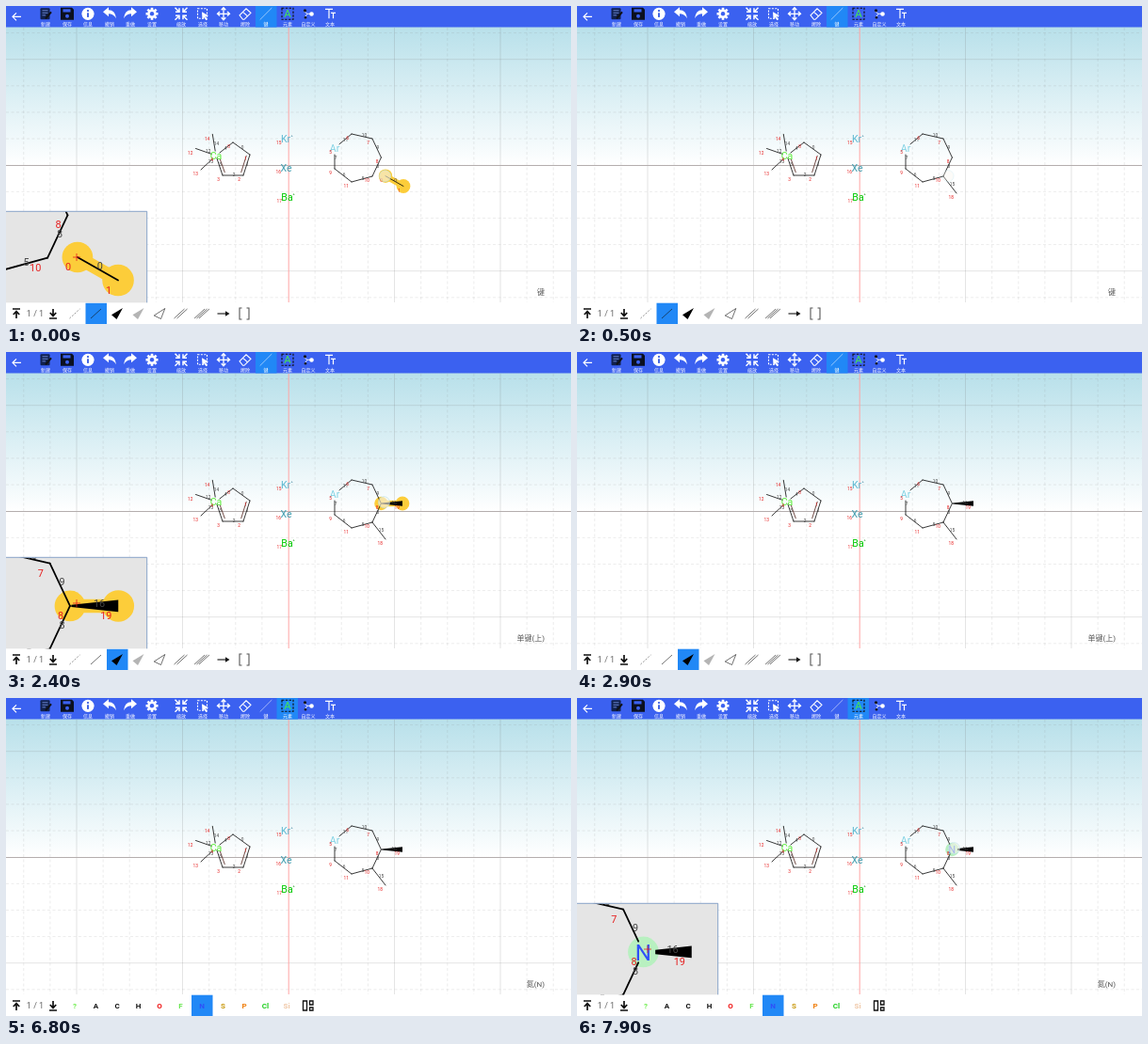
Animation of 600x338 px, one loop 8000 ms. Source, as an HTML page:

```html
<!DOCTYPE html>
<html lang="zh">
<head>
<meta charset="utf-8">
<style>
html, body { margin: 0; width: 100%; height: 100%; overflow: hidden; background: #fff; }
svg { display: block; width: 100vw; height: 100vh; }
text { font-family: Roboto, "Noto Sans CJK SC", "Noto Sans CJK", sans-serif; }
.caption { font-size: 5px; font-weight: 500; fill: #fff; text-anchor: middle; }
.hint { font-size: 8px; fill: #555; text-anchor: end; }
.num { font-size: 4.8px; fill: #444; }
.num.atom { fill: #e62020; text-anchor: end; }
.symbol { font-size: 10.6px; text-anchor: middle; }
.charge { font-size: 4px; }
.pick { font-size: 8px; font-weight: 700; text-anchor: middle; }
.bond { stroke: #000; stroke-width: .78; stroke-linecap: round; fill: none; }
.inner { stroke: #4a1a14; }
.white { stroke: #fff; stroke-width: 1.5; fill: none; }
.black { stroke: #111; stroke-width: 1.1; fill: none; }
</style>
</head>
<body>
<svg id="stage" viewBox="0 0 600 338" preserveAspectRatio="none" xmlns="http://www.w3.org/2000/svg"></svg>
<script>
const LOOP = 8000, ZOOM = 2.27, PITCH = 28.125;

// Markup helpers; "when" is a list such as "0-400 2300-2700" in ms.
const show = (when, body) => `<g data-on="${when}">${body}</g>`;
const path = (d, cls = 'black', extra = '') => `<path class="${cls}" d="${d}" ${extra}/>`;
const shape = (d, fill) => `<path d="${d}" fill="${fill}"/>`;
const text = (x, y, str, cls, extra = '') => `<text class="${cls}" x="${x}" y="${y}" ${extra}>${str}</text>`;
const rect = (x, y, w, h, fill, extra = '') =>
  `<rect x="${x}" y="${y}" width="${w}" height="${h}" fill="${fill}" ${extra}/>`;
const disc = (x, y, r, fill) => `<circle cx="${x}" cy="${y}" r="${r}" fill="${fill}"/>`;
const at = (x, y, body) => `<g transform="translate(${x} ${y})">${body}</g>`;

const atoms = {
  0: [241, 145], 1: [259, 158], 2: [252, 180], 3: [230, 180], 4: [223, 159],
  5: [349, 151], 6: [367, 136], 7: [389, 141], 8: [398.4, 161], 9: [349, 173],
  10: [389, 181], 11: [367, 187], 12: [201.5, 151.5], 13: [207, 174], 14: [219.3, 136.3],
  15: [295.5, 140.3], 16: [295, 171.5], 17: [296, 202.5], 18: [403, 199], 19: [421, 161]
};

// Point at a given distance from a towards b.
function toward(a, b, dist) {
  const len = Math.hypot(b[0] - a[0], b[1] - a[1]);
  return [a[0] + (b[0] - a[0]) * dist / len, a[1] + (b[1] - a[1]) * dist / len];
}
const line = (a, b, cls = 'bond') => path(`M${a}L${b}`, cls);
const atomNumber = (p, n) => text(p[0] - 3, p[1] + 6.2, n, 'num atom');
const bondNumber = (a, b, n) =>
  text((a[0] + b[0]) / 2 - .3, (a[1] + b[1]) / 2 + .5, n, 'num');

function bond(i, j, number, { trimI = 0, trimJ = 0, center } = {}) {
  const a = atoms[i], b = atoms[j];
  let out = line(toward(a, b, trimI), toward(b, a, trimJ));
  if (center) {
    const inner = p => toward(p, center, 4);
    out += line(toward(inner(a), b, trimI), toward(inner(b), a, trimJ), 'bond inner');
  }
  return out + bondNumber(a, b, number);
}
function wedge(start) {
  const half = .5 + (start - 399) * .1;
  return shape(`M${start} ${161 - half}L421 158.2V163.8L${start} ${161 + half}Z`, '#000') +
    bondNumber(atoms[8], atoms[19], 16);
}
const symbol = (x, y, str, fill) => text(x, y + 3.8, str, 'symbol', `fill="${fill}"`);
const glow = (a, b) =>
  path(`M${a}L${b}`, '', 'stroke="#fccd3a" stroke-width="6.4"') +
  disc(a[0], a[1], 7.2, '#fccd3a') + disc(b[0], b[1], 7.4, '#fccd3a');

function molecules() {
  const left = [241, 164];
  const loose = [[403, 180.7], [422, 191.5]];
  const numbers = Object.keys(atoms).filter(n => n < 18)
    .map(n => atomNumber(atoms[n], n)).join('');
  return show('0-100', glow(...loose) + line(...loose) + atomNumber(loose[0], 0) +
      atomNumber(loose[1], 1) + bondNumber(...loose, 0)) +
    show('100-400', glow(atoms[10], atoms[18])) +
    show('2300-2700', glow(atoms[8], atoms[19])) +
    show('7800-8000', disc(...atoms[8], 7.2, '#b8f0c0')) +
    bond(0, 1, 0) + bond(1, 2, 1, { center: left }) + bond(2, 3, 2) +
    bond(3, 4, 3, { trimJ: 3, center: left }) + bond(4, 0, 4, { trimI: 5 }) +
    bond(4, 12, 12, { trimI: 5 }) + bond(4, 13, 13, { trimI: 5 }) + bond(4, 14, 14, { trimI: 5 }) +
    bond(10, 11, 5) + bond(11, 9, 6) + bond(9, 5, 7, { trimJ: 7 }) +
    bond(7, 6, 10) + bond(6, 5, 11, { trimJ: 6.5 }) +
    show('0-7800', bond(8, 10, 8) + bond(8, 7, 9)) +
    show('7800-8000', bond(8, 10, 8, { trimI: 5.5 }) + bond(8, 7, 9, { trimI: 5.5 }) +
      symbol(...atoms[8], 'N', '#3050f8')) +
    show('100-8000', bond(10, 18, 15) + atomNumber(atoms[18], 18)) +
    show('2300-7800', wedge(399)) + show('7800-8000', wedge(404)) +
    show('2300-8000', atomNumber(atoms[19], 19)) +
    symbol(...atoms[4], 'Ca', '#5cee3c') + symbol(...atoms[5], 'Ar', '#80d1e3') +
    symbol(297, 141.2, 'Kr', '#5cb8d1') + symbol(297.5, 172, 'Xe', '#429eb0') +
    symbol(298.5, 203, 'Ba', '#00c900') +
    text(302.6, 138.6, '+', 'charge', 'fill="#357f98"') +
    text(304.6, 200.6, '+', 'charge', 'fill="#008a00"') + numbers;
}

function grid() {
  let out = rect(0, 22, 600, 148, 'url(#sky)');
  const ruled = (k, d) => path(d, '', k % 4
    ? 'stroke="#888" stroke-opacity=".23" stroke-width=".7" stroke-dasharray="3 2.5"'
    : 'stroke="#777" stroke-opacity=".22" stroke-width=".9"');
  for (let k = -10; k <= 10; k++) if (k) out += ruled(k, `M${300 + k * PITCH} 23V315`);
  for (let k = -5; k <= 5; k++) if (k) out += ruled(k, `M0 ${169.2 + k * PITCH}H600`);
  return out + path('M0 169.5H600', '', 'stroke="#b4aeae"') + path('M300.2 23V315', '', 'stroke="#ffa4a4"');
}

function header() {
  const spread = [0, 90, 180, 270];
  const around = (angles, d, extra) =>
    angles.map(a => path(d, 'white', `transform="rotate(${a})" ${extra || ''}`)).join('');
  const undo = shape('M-7 -2L-1 -7V-4Q6 -4 7 5Q4 0 -1 0V3Z', '#fff');
  const items = [
    [42, '新建', rect(-5.5, -6, 10, 12, '#10204c', 'rx="1"') +
      path('M-3.5 -3.5H2.5M-3.5 -1H2.5M-3.5 1.5H0', 'white', 'style="stroke-width:.8;stroke:#7f9cf0"') +
      path('M0 5L6 -2', 'black', 'style="stroke-width:2"')],
    [65, '保存', shape('M-7 -6.5H5L7 -4.5V6.5H-7Z', '#0b1020') + rect(-4.5, -5, 8, 3.2, '#3b61f0') +
      disc(0, 2.5, 2, '#3b61f0')],
    [87, '信息', disc(0, 0, 6.6, '#fff') + rect(-.9, -1, 1.8, 4.6, '#2e55de') + disc(0, -3.2, 1.1, '#2e55de')],
    [110, '撤销', undo],
    [132, '重做', `<g transform="scale(-1 1)">${undo}</g>`],
    [155, '设置', around([0, 45, 90, 135], 'M0 -6.5V6.5', 'style="stroke-width:2.6"') +
      disc(0, 0, 4.8, '#fff') + disc(0, 0, 2.2, '#3b61f0')],
    [186, '缩放', around(spread, 'M6.5 -6.5L2 -2M2 -6V-2H6')],
    [209, '选择', path('M-5.5 -5.5H4.5V5H-5.5Z', 'white', 'stroke-dasharray="2 1.4" style="stroke-width:1.1"') +
      shape('M-1 -2L6 2L3 3L5 6L3.5 7L1.5 4L-.5 6Z', '#fff')],
    [231, '移动', around(spread, 'M0 0V-6M-2.3 -4L0 -6.5L2.3 -4', 'style="stroke-width:1.3"')],
    [254, '擦除', path('M-6 1.5L1 -5.5L6 -1L-1 6H-2.5Z M-2.5 -2L2.5 2.5', 'white', 'style="stroke-width:1.1"')],
    [276, '键', path('M-6.3 6.3L6.3 -6.3', 'white', 'style="stroke-width:.7" opacity=".75"')],
    [299, '元素', path('M-6 -6H6V6H-6Z', 'black', 'stroke-dasharray="2.4 1.4"') +
      text(0, 4.1, 'A', 'pick', 'fill="#45e84c" style="font-size:11.5px;font-weight:400"')],
    [321, '自定义', path('M-5 -3L-1 0L-4 4M-1 0H3', 'white', 'style="stroke-width:.9"') +
      disc(-3.5, -3.5, 1.6, '#111') + disc(3.5, .2, 2.3, '#fff') + disc(-3, 4, 1.3, '#111')],
    [344, '文本', path('M-5 -5H3M-1 -5V5M1 -1H6M3.5 -1V5', 'white', 'style="stroke-width:1.2"')]
  ];
  return rect(0, 0, 600, 22.5, '#3b61f0') +
    show('0-5200', rect(265, 0, 22.5, 22.5, '#2188f6')) +
    show('5200-8000', rect(287.5, 0, 22.5, 22.5, '#2188f6')) +
    path('M16 11.3H7.5M11 7.3L7 11.3L11 15.3', 'white', 'style="stroke-width:1.2"') +
    items.map(([x, name, icon]) => at(x, 8.3, icon) + text(x, 20.7, name, 'caption')).join('');
}

function footer() {
  const cell = i => 73 + i * 22.5;
  const select = (when, i) => show(when, rect(cell(i) - 11, 315.7, 22.5, 22.3, '#2188f6'));
  const slant = (dx, extra) =>
    path(`M${dx - 5.5} 5L${dx + 5.5} -5`, 'black', `style="stroke-width:.75" ${extra || 'opacity=".8"'}`);
  const fin = 'M6 -6L-6 1.3L-.5 6Z';
  const bonds = [
    slant(0, 'stroke-dasharray="2 1.5" opacity=".6"'), slant(0), shape(fin, '#000'), shape(fin, '#b4b4b4'),
    path('M5.8 -5.5L-5.8 2L1.5 5.5Z', 'black', 'style="stroke-width:.75" opacity=".8"'),
    slant(-1.5) + slant(1.5), slant(-2.4) + slant(0) + slant(2.4),
    path('M-6 0H4') + shape('M2.5 -2.8L7 0L2.5 2.8Z', '#111'),
    path('M-2.5 -6H-5V6H-2.5M2.5 -6H5V6H2.5', 'black', 'style="stroke:#555"')
  ];
  const elements = [['?', '#70ee50'], ['A', '#111'], ['C', '#111'], ['H', '#111'], ['O', '#f01818'],
    ['F', '#66e64e'], ['N', '#3050f8'], ['S', '#c8980c'], ['P', '#f08010'], ['Cl', '#1fd01f'], ['Si', '#f0c8a8']];
  const tiles = path('M-5 -5H-1V5H-5ZM2 -5H5.5V-1H2ZM2 2H5.5V5H2Z', 'black', 'style="stroke-width:1.3"');
  const jump = 'M-4 -5H4M0 5V-2M-3.2 1L0 -2.4L3.2 1';
  return rect(0, 315.3, 600, 22.7, '#fff') +
    select('0-1400', 1) + select('1400-5200', 2) + select('5200-6700', 2) + select('6700-8000', 6) +
    at(11, 327, path(jump, 'black', 'style="stroke-width:1.7"')) +
    at(50, 327, path(jump, 'black', 'transform="scale(1 -1)" style="stroke-width:1.7"')) +
    text(31, 330.2, '1 / 1', 'pick', 'fill="#666" style="font-size:9px;font-weight:400"') +
    show('0-5200', bonds.map((icon, i) => at(cell(i), 327, icon)).join('')) +
    show('5200-8000', elements.map(([s, c], i) => text(cell(i), 329.8, s, 'pick', `fill="${c}"`)).join('') +
      at(cell(11), 327, tiles));
}

const hint = (when, str) => show(when, text(572, 307.4, str, 'hint'));

document.getElementById('stage').innerHTML = `
  <defs>
    <linearGradient id="sky" x2="0" y2="1">
      <stop stop-color="#b8e0ea"/><stop offset="1" stop-color="#fff"/>
    </linearGradient>
    <clipPath id="lens">${rect(0, 218.5, 149.5, 96.8, '#000')}</clipPath>
  </defs>` +
  rect(0, 0, 600, 338, '#fff') + grid() + `<g id="scene">${molecules()}</g>` +
  hint('0-1400', '键') + hint('1400-5200', '单键(上)') + hint('5200-6700', '碳(C)') + hint('6700-8000', '氮(N)') +
  header() + footer() +
  show('0-400 2300-2700 7800-8000',
    rect(0, 218, 150, 97.3, '#e5e5e5') +
    '<g clip-path="url(#lens)"><use id="zoomed" href="#scene"/></g>' +
    path('M0 218.3H149.7V315.3', '', 'fill="none" stroke="#7f9fc8" stroke-width=".9"') +
    path('M71 267H79M75 263V271', '', 'stroke="#e62020" stroke-width=".8"')) +
  '<circle id="touch" r="6.1" fill="#f4f2e8" fill-opacity=".62" stroke="#a8dbea" stroke-opacity=".5" stroke-width=".9"/>';

// Finger: time, x, y, opacity
const finger = [
  [0, 402.6, 180.7, 1], [100, 399, 180.7, 1], [200, 396, 180.7, 1], [300, 394, 180.7, 1],
  [400, 394, 180.7, .8], [500, 394, 180.7, .5], [600, 394, 180.7, .2], [700, 394, 180.7, 0],
  [1300, 118, 327, 1], [1400, 118, 327, .8], [1500, 118, 327, .4], [1600, 118, 327, 0],
  [2200, 401.5, 159.7, 1], [2700, 401.5, 159.7, .8], [2800, 401.5, 159.7, .4], [2900, 401.5, 159.7, 0],
  [5100, 295, 10, 1], [5200, 295, 10, .5], [5300, 295, 10, 0],
  [6600, 208, 327, 1], [6700, 208, 327, .5], [6800, 208, 327, 0],
  [7700, 400.4, 159.7, 1]
];
const touch = document.getElementById('touch');
const zoomed = document.getElementById('zoomed');
const timed = [...document.querySelectorAll('[data-on]')].map(el => ({
  el, spans: el.dataset.on.split(' ').map(s => s.split('-').map(Number))
}));
const begin = performance.now();

function frame() {
  const t = (performance.now() - begin) % LOOP;
  for (const { el, spans } of timed)
    el.style.display = spans.some(([from, to]) => t >= from && t < to) ? '' : 'none';
  const [, x, y, opacity] = finger.filter(step => step[0] <= t).pop();
  touch.setAttribute('transform', `translate(${x} ${y})`);
  touch.setAttribute('opacity', opacity);
  zoomed.setAttribute('transform', `translate(75 267) scale(${ZOOM}) translate(${-x} ${-y})`);
  requestAnimationFrame(frame);
}
frame();
</script>
</body>
</html>
```
